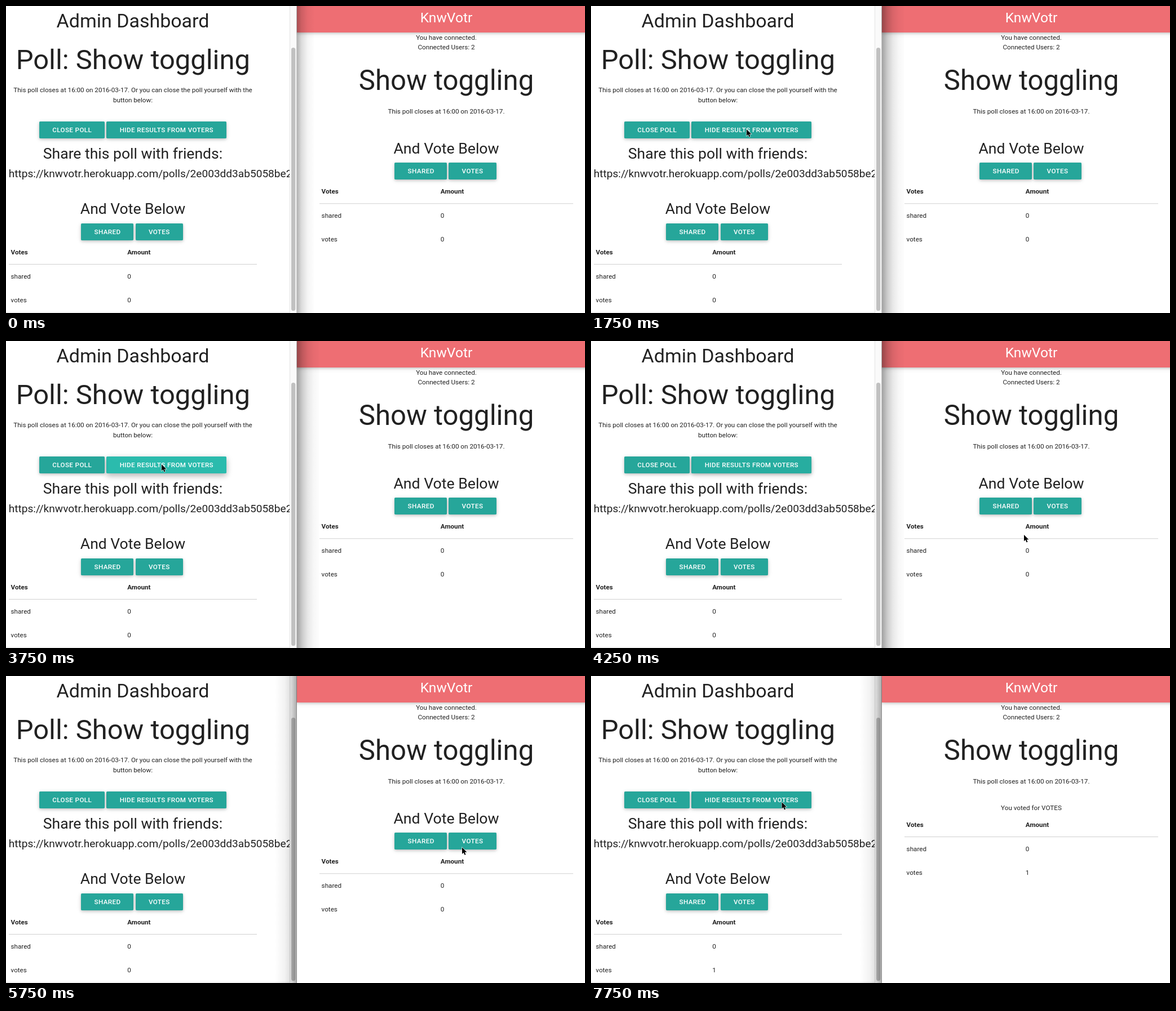
Write an HTML page that moves like this. It is 1027 px wide and 545 px high and loops after 8 s.

```html
<!DOCTYPE html>
<html lang="en">
<head>
<meta charset="utf-8">
<title>Poll toggling</title>
<style>
html, body { margin: 0; width: 100%; height: 100%; overflow: hidden; background: #fff; }
#stage { position: absolute; left: 0; top: 0; width: 1027px; height: 545px; overflow: hidden; background: #fff; }
#stage > div { position: absolute; box-sizing: border-box; }
svg { position: absolute; left: 0; top: 0; }
text { font-family: Roboto, Arial, sans-serif; fill: #212121; white-space: pre; }
.nav {
  left: 516px; top: 0; width: 520px; height: 46.8px; background: #ee6e73;
  box-shadow: 0 1.7px 4.2px rgba(0,0,0,.16), 0 1.7px 8.4px rgba(0,0,0,.12);
}
.btn, .glow { height: 29.7px; border-radius: 1.7px; }
.btn {
  background: #26a69a;
  box-shadow: 0 1.7px 4.2px rgba(0,0,0,.16), 0 1.7px 8.4px rgba(0,0,0,.12);
}
.glow {
  background: #2bbbad;
  box-shadow: 0 4.2px 9.2px rgba(0,0,0,.18), 0 3.3px 12.5px rgba(0,0,0,.15);
}
</style>
</head>
<body>
<div id="stage"></div>
<script>
let rem = 11.64;
const stage = document.getElementById('stage');
const NS = 'http://www.w3.org/2000/svg';

function make(tag, attrs, parent) {
  const el = document.createElementNS(NS, tag);
  for (const k in attrs) el.setAttribute(k, attrs[k]);
  parent.appendChild(el);
  return el;
}

function box(cls, x, y, w) {
  const el = document.createElement('div');
  el.className = cls;
  if (w) el.style.cssText = `left:${x}px;top:${y}px;width:${w}px`;
  stage.appendChild(el);
  return el;
}

const svg = make('svg', { width: 1027, height: 545, viewBox: '0 0 1027 545' }, document.body);
const group = () => make('g', {}, svg);
const base = group();

function label(parent, x, y, size, str, extra = {}) {
  const el = make('text', { x, y, 'font-size': size * rem, ...extra }, parent);
  el.textContent = str;
  return el;
}
const mid = (parent, x, y, size, str, extra) =>
  label(parent, x, y, size, str, { 'text-anchor': 'middle', ...extra });

// A button and its caption; returns everything that has to be toggled
function button(x, y, w, str, cls = 'btn') {
  const el = box(cls, x, y, w);
  const cap = mid(base, x + w / 2 + .2, y + 18.8, 1, str,
    { 'font-weight': 500, 'letter-spacing': .4, style: 'fill:#fff' });
  return [el, cap];
}

function table(parent, x, y, w, col) {
  const bold = { 'font-weight': 700 };
  label(parent, x + 3.6, y, 1, 'Votes', bold);
  label(parent, col, y, 1, 'Amount', bold);
  make('rect', { x, y: y + 17, width: w, height: 1, fill: '#d0d0d0' }, parent);
  label(parent, x + 3.6, y + 43, 1, 'shared');
  label(parent, col, y + 43, 1, '0');
  label(parent, x + 3.6, y + 85, 1, 'votes');
  return label(parent, col, y + 85, 1, '0');
}

function shade(id, x, w, flip, stops) {
  const g = make('linearGradient', { id, x1: flip ? 1 : 0, x2: flip ? 0 : 1 }, svg);
  for (const [offset, a] of stops) make('stop', { offset, 'stop-color': '#000', 'stop-opacity': a }, g);
  return make('rect', { x, y: 0, width: w, height: 545, fill: `url(#${id})` }, svg);
}

// Admin window
mid(base, 225, 38, 2.92, 'Admin Dashboard');
mid(base, 225.3, 112, 4.2, 'Poll: Show toggling');
mid(base, 225, 153.4, 1, 'This poll closes at 16:00 on 2016-03-17. Or you can close the poll yourself with the');
mid(base, 225, 170.8, 1, 'button below:');
mid(base, 225, 271, 2.28, 'Share this poll with friends:');
const clip = make('clipPath', { id: 'page' }, svg);
make('rect', { x: 0, y: 0, width: 503, height: 545 }, clip);
label(base, 4.8, 304, 1.64, 'https://knwvotr.herokuapp.com/polls/2e003dd3ab5058be2', { 'clip-path': 'url(#page)' });
mid(base, 225, 369.3, 2.28, 'And Vote Below');
button(133.3, 386, 93, 'SHARED');
button(229.5, 386, 84.2, 'VOTES');
const count = table(base, 5, 441, 440, 215.3);
make('rect', { x: 0, y: 543.5, width: 503, height: 1, fill: '#e2e2e2' }, base);

const rowY = 204.9;
const [hideBox, hideText] = button(178, rowY, 213.3, 'HIDE RESULTS FROM VOTERS');
const hideGlow = box('glow', 178, rowY, 213.3);
const hideSet = [...button(59, rowY, 116, 'CLOSE POLL'), hideText];
const shareSet = [
  ...button(54.7, rowY, 116, 'CLOSE POLL'),
  ...button(174, rowY, 221.5, 'SHARE RESULTS WITH VOTERS', 'glow')
];

// Scrollbar
make('rect', { x: 503, y: 0, width: 12, height: 545, fill: '#fafafa' }, base);
make('rect', { x: 503, y: 0, width: 1, height: 545, fill: '#e4e4e4' }, base);
make('rect', { x: 506, y: 74, width: 7.3, height: 467, rx: 3.6, fill: '#c1c1c1' }, base);

// Voter window
rem = 11.69;
box('nav');
mid(base, 781, 28.8, 2.1, 'KnwVotr', { style: 'fill:#fff' });
mid(base, 781, 59.5, 1, 'You have connected.');
mid(base, 781, 77, 1, 'Connected Users: 2');
mid(base, 781, 149.3, 4.2, 'Show toggling');
mid(base, 781, 191.4, 1, 'This poll closes at 16:00 on 2016-03-17.');

const ballotSet = [
  mid(base, 781, 261.6, 2.28, 'And Vote Below'),
  ...button(689.3, 278.4, 93.2, 'SHARED'),
  ...button(785, 278.4, 84.5, 'VOTES')
];
const results = group();
table(results, 556, 333.3, 450, 770.8);
const voted = group();
mid(voted, 781, 238, 1, 'You voted for VOTES');
table(voted, 556, 268, 450, 770.8).textContent = '1';

// Window shadows
const dim = shade('dim', 516, 32, false, [[0, .3], [.25, .14], [.6, .04], [1, 0]]);
const strong = shade('strong', 516, 39, false, [[0, .37], [.25, .2], [.5, .09], [.75, .035], [1, .01]]);
const front = shade('front', 477, 39, true, [[0, .32], [.25, .14], [.55, .05], [1, 0]]);
make('rect', { x: 515, y: 0, width: 1, height: 545, fill: '#000', opacity: .2 }, svg);

const cursor = make('path', {
  d: 'M0 0V11.6L2.7 9.1L4.6 13.4L6.5 12.6L4.7 8.4H8.4Z',
  fill: '#000', stroke: '#fff', 'stroke-width': 1.1, 'paint-order': 'stroke'
}, svg);

// Steps: time, then value
const LOOP = 8000;
const tips = [
  [0, null], [500, [348.5, 180.5]], [750, [253, 230.5]], [1000, [254.5, 228]],
  [1250, [276, 219]], [4250, [768, 344]], [4500, [773.5, 346]], [4750, [798.5, 322]],
  [5000, [809, 304.3]], [7250, [425, 261]], [7500, [352.5, 236.5]], [7750, [338.5, 224]]
];
const hover = [[0, 0], [2500, 1], [4250, .35], [4500, 0]];

function at(steps, t) {
  let v = steps[0][1];
  for (const [start, value] of steps) if (t >= start) v = value;
  return v;
}
const show = (on, ...els) => els.forEach(el => { el.style.visibility = on ? 'visible' : 'hidden'; });

function draw(t) {
  const sharing = t >= 2750 && t < 3750;
  const hasVoted = t >= 6500;
  const glow = at(hover, t);
  show(!sharing, ...hideSet, hideGlow);
  show(sharing, ...shareSet);
  show(!sharing && glow < 1, hideBox);
  hideGlow.style.opacity = glow;
  show(!hasVoted, ...ballotSet);
  show(!hasVoted && (t < 2500 || t >= 3750), results);
  show(hasVoted, voted);
  count.textContent = hasVoted ? '1' : '0';
  show(t < 1750, dim);
  show(t >= 1750 && t < 5750, strong);
  show(t >= 5750, front);
  const tip = at(tips, t);
  show(tip, cursor);
  if (tip) cursor.setAttribute('transform', `translate(${tip})`);
}

const start = performance.now();
function tick() {
  draw((performance.now() - start) % LOOP);
  requestAnimationFrame(tick);
}
draw(0);
requestAnimationFrame(tick);
</script>
</body>
</html>
```
